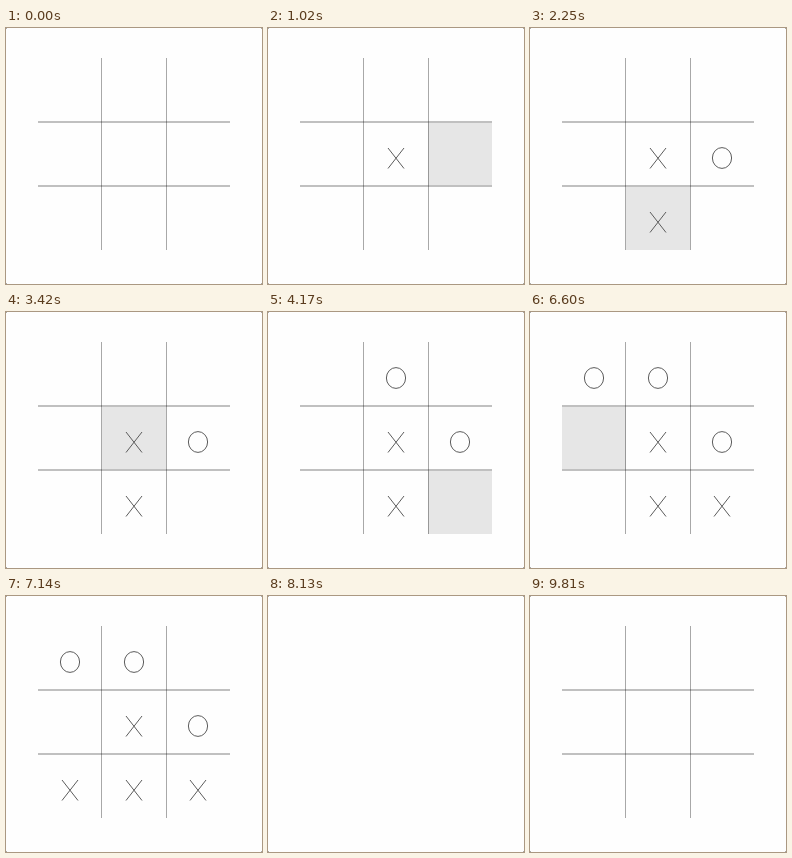
Write an HTML page that moves like this. It is 256 px wide and 256 px high and loops after 9930 ms.

```html
<!DOCTYPE html>
<html lang="en">
<head>
<meta charset="utf-8">
<title>Noughts and crosses</title>
<style>
  html, body { margin: 0; width: 100%; height: 100%; overflow: hidden; background: #fefefe; }
  svg { display: block; width: 100vw; height: 100vh; }
  .mark { fill: none; stroke: #5c5c5c; stroke-width: 1; }
</style>
</head>
<body>
<svg viewBox="0 0 256 256">
  <path fill="#aaa" d="M0 0h1v1h-1zM255 0h1v1h-1zM0 255h1v1h-1zM255 255h1v1h-1z"/>
  <g id="board">
    <rect id="hover" width="64" height="64" fill="#e6e6e6"/>
    <path fill="#c0c0c0" d="M32 93h192v2h-192zM32 157h192v2h-192z"/>
    <path fill-opacity=".34" d="M95 30h1v192h-1zM160 30h1v192h-1z"/>
    <g id="marks"></g>
  </g>
</svg>
<script>
const LOOP = 9930;
const CELL = 64;
const MS_PER_CELL = 180;
const ENTER = 30, LEAVE = 7140;
const BLINK = { start: 7560, period: 570, off: 180 };
const CLEAR = 8610;
const START = { x: 2, y: 2 };

// Crosses and noughts in turn: column, row, pointer arrival, click.
const moves = [
  [1, 1, 120, 750],
  [2, 1, 1020, 1470],
  [1, 2, 1830, 2250],
  [1, 0, 3480, 3630],
  [2, 2, 4170, 4890],
  [0, 0, 6150, 6390],
  [0, 2, 6780, 7110]
].map(([x, y, arrive, click]) => ({ x, y, arrive, click }));

// The centre cell is crossed on the way to the sixth move.
moves.splice(5, 0, { x: 0, y: 1, arrive: 5610, click: 5620, pass: true });

const byId = id => document.getElementById(id);
const board = byId('board'), hover = byId('hover');
const show = (el, on) => { el.style.visibility = on ? 'inherit' : 'hidden'; };

function addMark(move, isCross) {
  const x = CELL * (move.x + 1), y = CELL * (move.y + 1) + 2;
  const el = document.createElementNS('http://www.w3.org/2000/svg', 'path');
  el.setAttribute('class', 'mark');
  el.setAttribute('d', isCross
    ? `M${x - 8} ${y - 10}l16 20.5M${x + 8} ${y - 10}l-16 20.5`
    : `M${x - 9.6} ${y}a9.6 10.4 0 1 1 19.2 0a9.6 10.4 0 1 1 -19.2 0`);
  byId('marks').append(el);
  return el;
}

const marks = moves.filter(move => !move.pass)
  .map((move, i) => ({ click: move.click, el: addMark(move, i % 2 === 0) }));

// The pointer goes straight to its next cell, crossing the last edge on arrival.
function pointerCell(t) {
  const next = moves.findIndex(move => t < move.click);
  const i = next < 0 ? moves.length - 1 : next;
  const to = moves[i], from = moves[i - 1] || START;
  const dx = to.x - from.x, dy = to.y - from.y;
  const length = Math.max(Math.abs(dx), Math.abs(dy));
  const travelled = length - 0.5 + (t - to.arrive) / MS_PER_CELL;
  const p = Math.min(1, Math.max(0, travelled / length));
  return { x: Math.round(from.x + dx * p), y: Math.round(from.y + dy * p) };
}

function draw(t) {
  const cell = pointerCell(t);
  hover.setAttribute('x', 32 + CELL * cell.x);
  hover.setAttribute('y', 30 + CELL * cell.y);
  show(hover, t >= ENTER && t < LEAVE);
  for (const { click, el } of marks) show(el, t >= click && t < CLEAR);

  const blinking = t >= BLINK.start && t < CLEAR;
  show(board, !(blinking && (t - BLINK.start) % BLINK.period < BLINK.off));
}

const start = performance.now();
function tick() {
  draw((performance.now() - start) % LOOP);
  requestAnimationFrame(tick);
}
tick();
</script>
</body>
</html>
```
